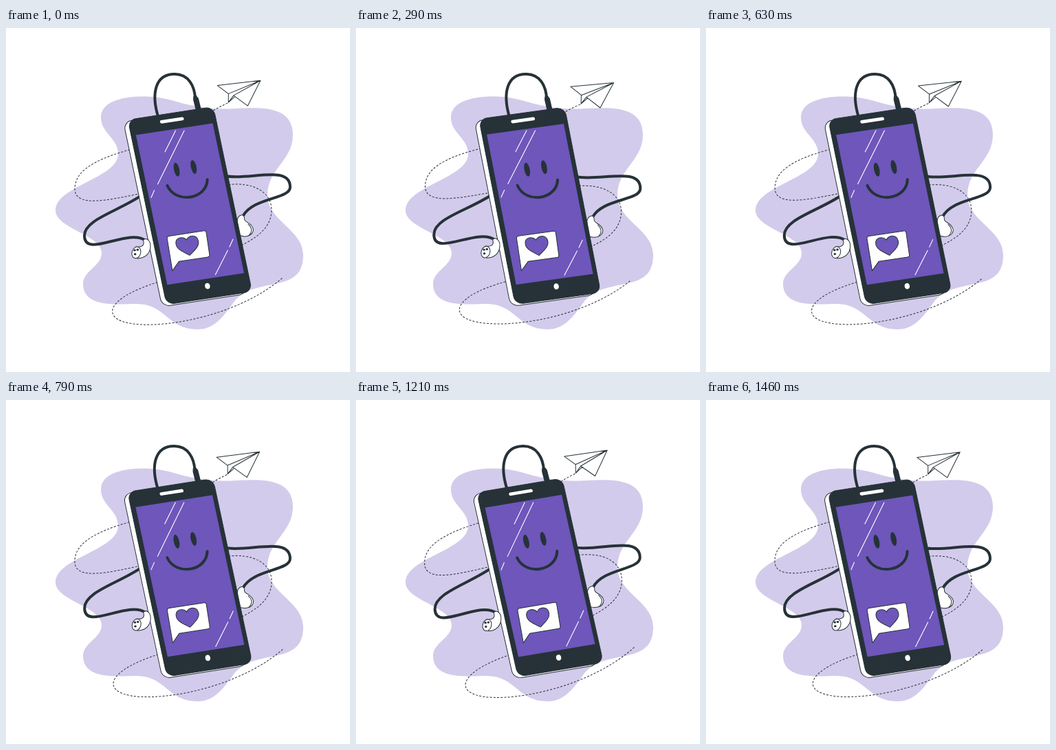
Write an HTML page with a canvas that moves like this. It is 500 by 500 pixels and loops after 1.5 s.

```html
<!DOCTYPE html>
<html lang="en">
<head>
<meta charset="utf-8">
<title>Happy phone</title>
<style>
html, body { margin: 0; width: 100%; height: 100%; overflow: hidden; background: #fff; }
canvas { display: block; width: 100vw; height: 100vh; }
</style>
</head>
<body>
<canvas id="stage" width="500" height="500"></canvas>
<script>
const ctx = document.getElementById('stage').getContext('2d');
const DARK = '#263238', PURPLE = '#6e56bb', PALE = '#d3cbeb', WHITE = '#fff';
const LOOP = 1500, STEPS = 36;

const svg = d => new Path2D(d);

function fill(path, color) {
  ctx.fillStyle = color;
  ctx.fill(path);
}

function stroke(path, width = 1, color = DARK, cap = 'round') {
  ctx.strokeStyle = color;
  ctx.lineWidth = width;
  ctx.lineCap = cap;
  ctx.lineJoin = 'round';
  ctx.stroke(path);
}

function outlined(path, color = WHITE) {
  fill(path, color);
  stroke(path);
}

function ellipse(x, y, rx, ry, tilt = 0) {
  const path = new Path2D();
  path.ellipse(x, y, rx, ry, tilt, 0, Math.PI * 2);
  return path;
}

function roundRect(x, y, w, h, r) {
  const path = new Path2D();
  path.roundRect(x, y, w, h, r);
  return path;
}

// Draws with the transform applied, then restores it
function within(matrix, draw) {
  ctx.save();
  ctx.transform(...matrix);
  draw();
  ctx.restore();
}

// S-curves between points where the outline runs vertically
function wave(path, points, bend = 0.43) {
  for (let i = 1; i < points.length; i++) {
    const [x0, y0] = points[i - 1], [x1, y1] = points[i];
    const lean = (y1 - y0) * bend;
    path.bezierCurveTo(x0, y0 + lean, x1, y1 - lean, x1, y1);
  }
}

function makeBlob() {
  const path = new Path2D();
  path.moveTo(138, 130);
  path.bezierCurveTo(138, 110, 162, 99.5, 200, 99.5);
  path.bezierCurveTo(245, 99.5, 255, 117, 320, 117.5);
  path.bezierCurveTo(350, 118, 417, 105, 417, 155);
  wave(path, [[417, 155], [380, 243], [432, 330]]);
  path.bezierCurveTo(432, 390, 360, 358, 330, 400);
  path.bezierCurveTo(312, 425, 300, 438, 278, 438);
  path.bezierCurveTo(235, 438, 232, 401, 190, 401);
  path.bezierCurveTo(165, 401, 112, 408, 112, 372);
  wave(path, [[112, 372], [139, 327], [72, 265], [163, 183], [138, 130]]);
  return path;
}
const blob = makeBlob();

const trail = svg(`M322 109 Q310 114 298 122
  M180 177 C118 194 100 213 100 234 C100 262 150 250 194 241
  M318 228 C362 222 386 240 386 264 C386 295 355 309 338 318
  M226 368 C175 383 155 400 155 412 C155 448 320 435 403 362`);

const plane = svg(`M369.6 76 L323 95.5 V108 L330.5 98 Z
  L307 83.5 L323 95.5 Z L330.5 98 L351 113 Z M323 108 L332.5 99.5`);

const cables = svg(`M221 129 C211 96 216 67 245 67 C265 67 274 84 275 103
  M318 215 C352 222 413 198 413 231 C413 249 358 246 344 274
  M199 242 C165 266 114 278 114 302 C114 336 178 290 203 309`);
const jack = svg('M276 104 L279.7 119');
const jackNeck = svg('M275 101 L276 106');

const leftBud = svg('M199.5 308.5 C203 304 210 308 210 317 C210 327 203 335 191 335 L189 318 C198 319 202 316 199.5 308.5 Z');
const rightBud = svg('M336 281 C337 270 347 269 346.5 277 C346 283 358 282 359.5 293 C359 302 348 305 338 301 Z');
const rightBudRim = svg('M352 285 Q361 293 353 301.5');

// Phone parts live in its own tilted frame, origin at the top left corner
const PHONE = [0.986, -0.152, 0.206, 0.979, 177, 133.5];
const face = roundRect(0, 0, 126, 274.4, 12);
const screen = roundRect(6.9, 23.7, 113.2, 222.3, 0);
const speaker = roundRect(45.3, 8, 35, 4.8, 2.4);
const home = ellipse(64, 256.6, 3.7, 4.4);
const smile = svg('M36.6 103.3 C43 132 89 132 95.7 103.3');
const bubble = svg('M24 176.4 H75.3 Q78.3 176.4 78.2 179.4 L76.3 212 Q76.2 215 73.2 215 H30.6 L18.5 227 L20.6 179.4 Q21 176.4 24 176.4 Z');
const heart = svg('M48 186 C45 179 31.5 179 31.5 190 C31.5 198 41 203 48 208.5 C55 203 64.5 198 64.5 190 C64.5 179 51 179 48 186 Z');
const glints = svg('M246.5 149 L231 180 M259 149 L220.5 227 M215.5 236 L211 246.5 M330 307 L325 318 M322.5 323 L304.5 358.5');

function drawFlight() {
  ctx.setLineDash([3, 2.2]);
  stroke(trail, 1, DARK, 'butt');
  ctx.setLineDash([]);
  outlined(plane);
}

function drawFront() {
  outlined(face, DARK);
  fill(screen, PURPLE);
  fill(speaker, WHITE);
  fill(home, WHITE);
  for (const x of [54.8, 79.9]) fill(ellipse(x, 82.3, 4, 10.2), DARK);
  stroke(smile, 4);
  outlined(bubble);
  outlined(heart, PURPLE);
}

function drawLeftBud() {
  outlined(leftBud);
  outlined(ellipse(189.5, 326.5, 6.3, 8.5, 0.3));
  for (let i = 0; i < 3; i++) {
    const angle = 2.2 + i * 1.6;
    fill(ellipse(189.5 + 3 * Math.cos(angle), 325.5 + 4 * Math.sin(angle), 1.8, 1.5), DARK);
  }
}

function drawPhone() {
  stroke(cables, 4);
  stroke(jackNeck, 6);
  stroke(jack, 8);
  outlined(rightBud);
  stroke(rightBudRim);
  within([1, 0, 0, 1, -6.5, 3], () => within(PHONE, () => outlined(face)));
  within(PHONE, drawFront);
  stroke(glints, 1.1, WHITE);
  drawLeftBud();
}

function swayed(degrees, draw) {
  const turn = new DOMMatrix().translate(250, 250).rotate(degrees).translate(-250, -250);
  within([turn.a, turn.b, turn.c, turn.d, turn.e, turn.f], draw);
}

// Linear swing: 0, +1 at a quarter, -1 at three quarters, back to 0
function swing(phase) {
  if (phase < 0.25) return phase * 4;
  if (phase < 0.75) return 2 - phase * 4;
  return phase * 4 - 4;
}

let start;
function render(now) {
  start ??= now;
  // 24 pictures a second, each posed at the middle of its step
  const step = Math.floor(((now - start) % LOOP + 4) * STEPS / LOOP) % STEPS;
  const tilt = swing((step + 0.5) / STEPS);
  ctx.fillStyle = WHITE;
  ctx.fillRect(0, 0, 500, 500);
  fill(blob, PALE);
  swayed(tilt * 2, drawFlight);
  swayed(tilt, drawPhone);
  requestAnimationFrame(render);
}
requestAnimationFrame(render);
</script>
</body>
</html>
```
